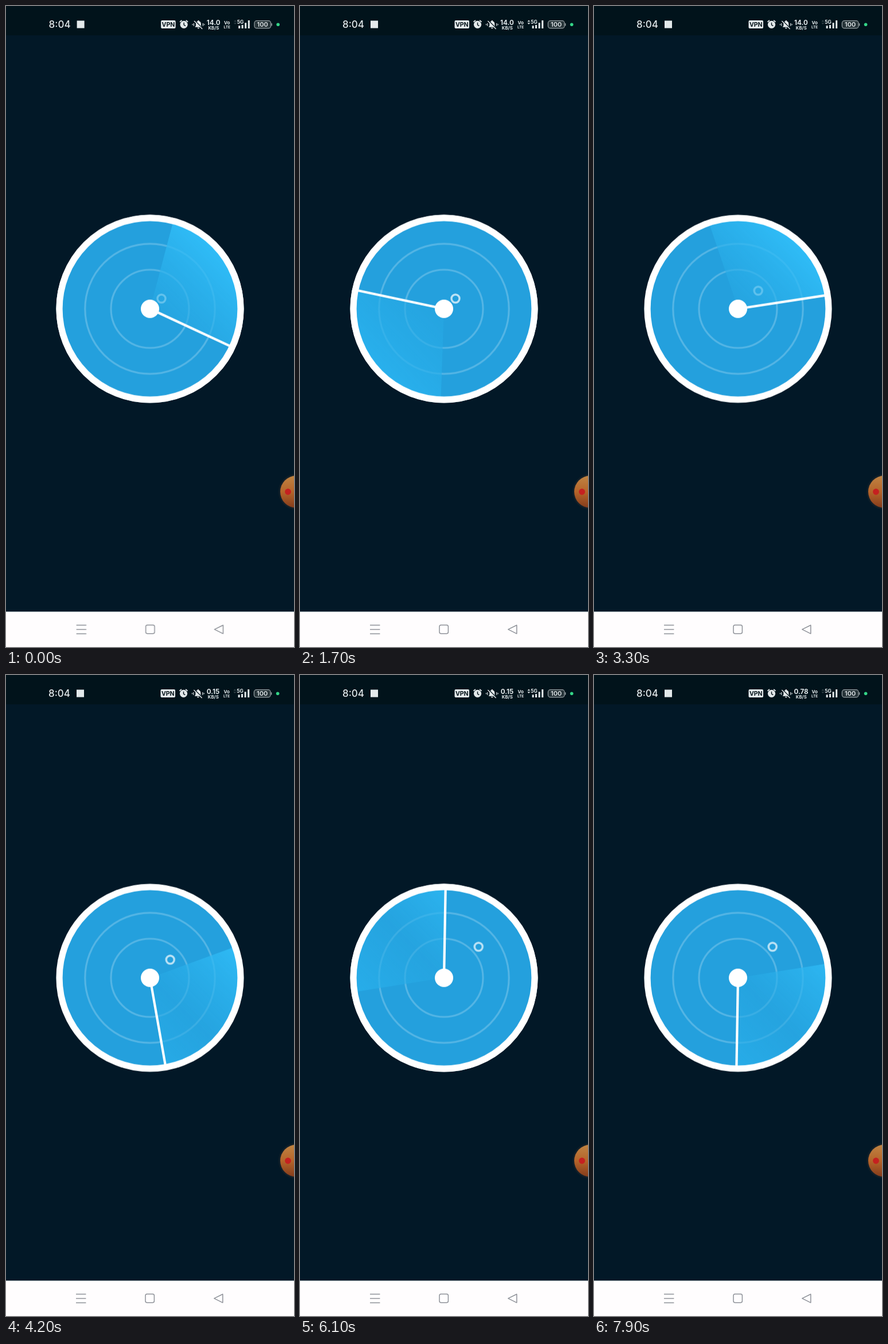
An HTML page without scripts that plays this animation: 502x1115 px, repeating every 8000 ms.

```html
<!DOCTYPE html>
<html lang="en">
<head>
<meta charset="utf-8">
<title>Radar scan</title>
<style>
  @property --a { syntax: "<angle>"; inherits: true; initial-value: 0deg; }

  html, body { margin: 0; width: 100%; height: 100%; overflow: hidden; background: #021827; }
  svg { display: block; width: 502px; height: 1115px; }
  text { font-family: Inter, Roboto, sans-serif; font-weight: 700; fill: #e4e9eb; text-anchor: middle; }

  .radar, .ping, .nudge, .blip, .speed, .data {
    animation: 8s -10ms infinite step-end;
  }

  /* sweep: ten updates a second, about 100 degrees per second */
  .radar { animation-name: sweep; }
  .spin { transform: rotate(var(--a)); }
  .still { transform: rotate(calc(-1 * var(--a))); }
  @keyframes sweep {
    0%     { --a: 114.9deg; animation-timing-function: steps(17); }
    21.25% { --a: 282deg;   animation-timing-function: steps(11); }
    35%    { --a: 392deg;   animation-timing-function: steps(14); }
    52.5%  { --a: 530deg;   animation-timing-function: steps(19); }
    76.25% { --a: 721deg;   animation-timing-function: steps(10); }
    88.75% { --a: 820.6deg; animation-timing-function: steps(9); }
    100%   { --a: 911deg; }
  }

  /* a ring leaves the rim each time the hand passes the top */
  .ping { animation-name: ping; }
  @keyframes ping {
    0%, 31.25%, 76.25% {
      r: 158px; stroke-width: 11px; opacity: 1;
      animation-timing-function: steps(10);
    }
    43.75%, 88.75%, 100% {
      r: 706px; stroke-width: 0px; opacity: 0;
      animation-timing-function: step-end;
    }
  }

  .blip { animation-name: blip; }
  @keyframes blip {
    0%     { transform: translate(20px, -17.8px); }
    31.25% { transform: translate(35.2px, -31.5px); }
    76.25%, 100% { transform: translate(60.2px, -54px); }
  }

  .nudge { animation-name: nudge; }
  @keyframes nudge {
    0% { transform: translateX(.6px); }
    12.5%, 100% { transform: none; }
  }

  .speed { opacity: 0; }
  .s1 { animation-name: s1; }
  .s2 { animation-name: s2; }
  .s3 { animation-name: s3; }
  @keyframes s1 { 0% { opacity: 1; } 46.25%, 100% { opacity: 0; } }
  @keyframes s2 { 0% { opacity: 0; } 46.25% { opacity: 1; } 83.75%, 100% { opacity: 0; } }
  @keyframes s3 { 0% { opacity: 0; } 83.75%, 100% { opacity: 1; } }

  .data { animation-name: data; }
  @keyframes data {
    0%, 25%, 81.25%, 100% { opacity: .22; }
    12.5%, 68.75% { opacity: 1; }
  }
</style>
</head>
<body>
<svg viewBox="0 0 502 1115" xmlns="http://www.w3.org/2000/svg">
  <defs>
    <linearGradient id="glow" gradientUnits="userSpaceOnUse" x1="-108" y1="108" x2="108" y2="-108">
      <stop offset="0" stop-color="#2ab4f0" stop-opacity=".8"/>
      <stop offset=".5" stop-color="#27a7e2" stop-opacity=".55"/>
      <stop offset="1" stop-color="#32c1fb" stop-opacity=".85"/>
    </linearGradient>
    <linearGradient id="amber" x2="0" y2="1">
      <stop offset="0" stop-color="#bf8443"/>
      <stop offset=".5" stop-color="#b5642a"/>
      <stop offset="1" stop-color="#843c1c"/>
    </linearGradient>
    <radialGradient id="halo">
      <stop offset=".85" stop-color="#22262a"/>
      <stop offset="1" stop-color="#22262a" stop-opacity="0"/>
    </radialGradient>
    <clipPath id="wedge">
      <path d="M0 0V-154A154 154 0 0 0 -151.7 26.7Z"/>
    </clipPath>
  </defs>

  <rect width="502" height="1115" fill="#021827"/>
  <rect width="502" height="51" fill="#01131b"/>

  <g class="radar" transform="translate(251 526.7)">
    <circle class="ping" r="158" fill="none" stroke="#fff"/>
    <circle r="158" fill="#24a0dd"/>
    <g fill="none" stroke="#fff">
      <g stroke-width="3.2" stroke-opacity=".22">
        <circle r="68"/>
        <circle r="113.2"/>
      </g>
      <circle class="blip" r="7" stroke-width="3.4" stroke-opacity=".7"/>
    </g>
    <g class="spin" clip-path="url(#wedge)">
      <circle class="still" r="153" fill="url(#glow)"/>
    </g>
    <path class="spin" d="M0 0V-154" stroke="#fff" stroke-width="4.2"/>
    <circle r="158" fill="none" stroke="#fff" stroke-width="11.2"/>
    <circle r="16" fill="#fff"/>
  </g>

  <circle cx="506" cy="845" r="32" fill="url(#halo)"/>
  <circle cx="506" cy="845" r="28" fill="url(#amber)"/>
  <circle cx="491.5" cy="845" r="5.4" fill="#c52020"/>

  <!-- status bar -->
  <g class="nudge" fill="#e4e9eb">
    <text x="93" y="38.3" font-size="17" style="font-weight:500">8:04</text>
    <rect x="123" y="25.5" width="13" height="13"/>

    <rect x="269.5" y="25" width="25.5" height="14" rx="2"/>
    <text x="282.3" y="35.9" font-size="10.5" style="fill:#08161d">VPN</text>

    <g transform="translate(309.5 32.3)">
      <circle r="6.6"/>
      <path d="M-7-4.5L-3.6-7.4M7-4.5L3.6-7.4" stroke="#e4e9eb" stroke-width="1.8"/>
      <path d="M0-3.6V.6L2.8 2.4" fill="none" stroke="#08161d" stroke-width="1.4"/>
    </g>

    <g transform="translate(334.8 32.3)">
      <path d="M-6 4.5L-4.5 2V-1.5A4.5 4.5 0 0 1 4.5-1.5V2L6 4.5ZM-1.8 5.5H1.8A1.8 1.8 0 0 1 -1.8 5.5ZM-1-7.4H1V-5H-1Z"/>
      <path d="M-6.4-7L7.4 6.8" stroke="#01131b" stroke-width="1.6"/>
      <path d="M-7.4-6.4L6.8 7.6" stroke="#e4e9eb" stroke-width="1.4"/>
      <path d="M-8-2.4V2.4M8-2.4V2.4M-10.3-1V1M10.3-1V1" stroke="#e4e9eb" stroke-width="1.2"/>
    </g>

    <g font-size="11.6">
      <text class="speed s1" x="361" y="32.8">14.0</text>
      <text class="speed s2" x="361" y="32.8">0.15</text>
      <text class="speed s3" x="361" y="32.8">0.78</text>
    </g>
    <text x="361.3" y="40.6" font-size="7.8">KB/S</text>
    <text x="384.6" y="31.8" font-size="8">Vo</text>
    <text x="384.6" y="39.4" font-size="6.4">LTE</text>

    <path class="data" d="M396.4 27.3L398.8 24.4L401.2 27.3ZM396.4 29.2H401.2L398.8 32Z"/>
    <text x="408" y="31.4" font-size="8.4">5G</text>
    <path d="M404.6 34.2h3V39h-3ZM410 33h3V39h-3ZM415.6 29.2h3V39h-3ZM421.2 25h3V39h-3Z"/>

    <rect x="432.4" y="25.7" width="28.6" height="13" rx="4" fill="#273439" stroke="#9aa2a6" stroke-width="1.2"/>
    <rect x="461.9" y="30" width="1.4" height="4.6" rx=".7" fill="#9aa2a6"/>
    <text x="446.6" y="36.2" font-size="11" style="font-weight:600">100</text>
    <circle cx="473.6" cy="32.2" r="2.8" fill="#34d587"/>
  </g>

  <!-- navigation bar -->
  <rect y="1053.5" width="502" height="62" fill="#fffdfe"/>
  <g class="nudge" fill="none" stroke="#8f9299" stroke-width="1.5">
    <path d="M122 1077H139.4M122 1084.5H139.4M122 1092H139.4"/>
    <rect x="243" y="1076.8" width="15.4" height="15" rx="3"/>
    <path d="M362.8 1084.4L377.8 1077V1091.8Z" stroke-linejoin="round"/>
  </g>
</svg>
</body>
</html>
```
